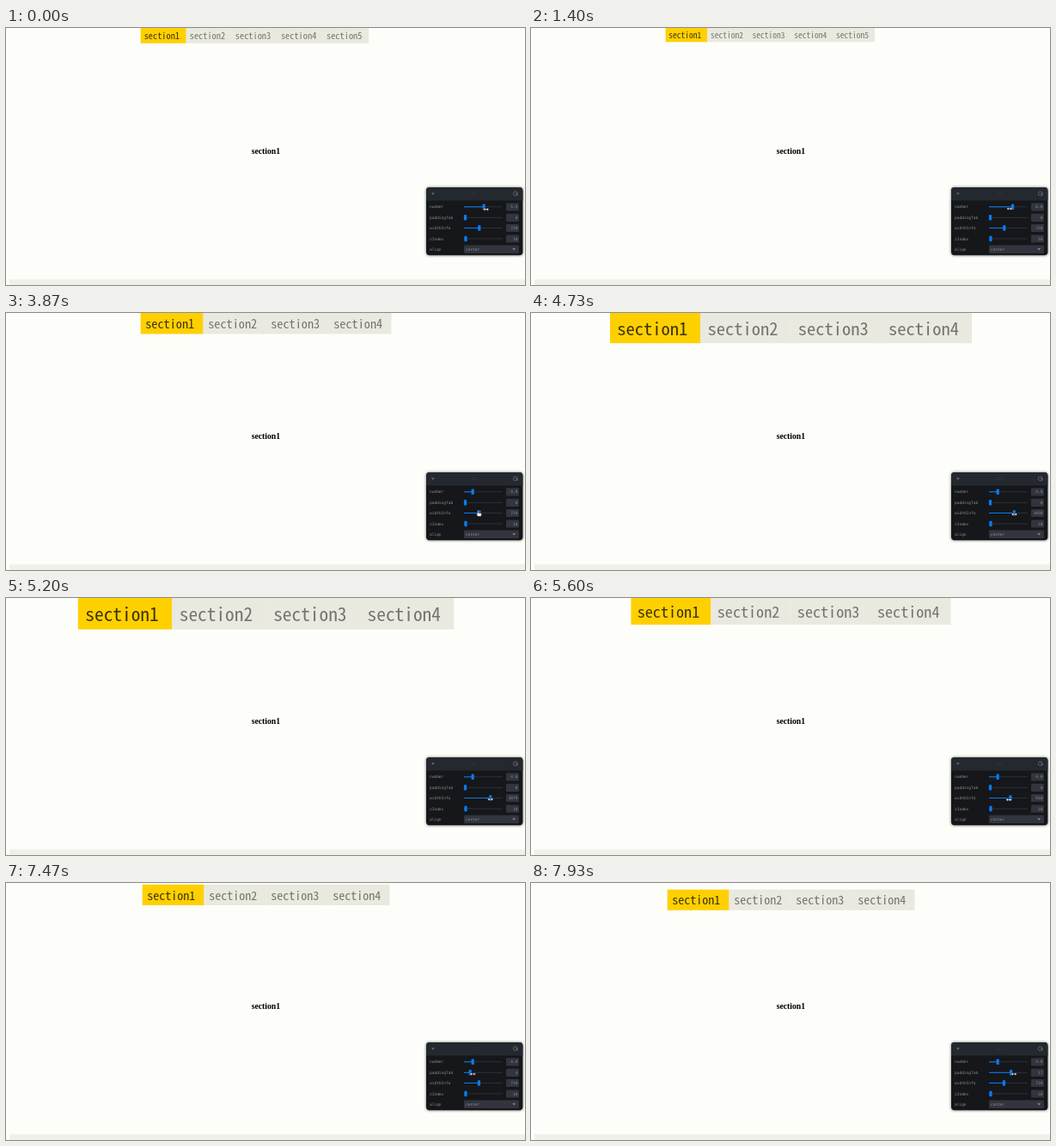
Write an HTML page that moves like this. It is 604 px wide and 300 px high and loops after 8 s.

```html
<!DOCTYPE html>
<html lang="en">
<head>
<meta charset="utf-8">
<title>Section tabs</title>
<style>
  html, body { margin: 0; width: 100%; height: 100%; overflow: hidden; background: #fdfdfa; }
  svg { display: block; width: 604px; height: 300px; }
  .tab { font-family: "Noto Sans Mono CJK JP", "Noto Sans CJK JP", "Open Sans", sans-serif; font-weight: 300; fill: #74746e; }
  .tab.on { fill: #3d320a; }
  .head { font: bold 9.73px "Liberation Serif", serif; fill: #000; text-anchor: middle; }
  .gui { font: 4.5px "DejaVu Sans Mono", "Noto Sans Mono", monospace; fill: #8c8e92; }
  .num { text-anchor: end; }
</style>
</head>
<body>
<svg viewBox="0 0 604 300">
  <defs>
    <clipPath id="clip"><rect id="view" height="60"/></clipPath>
    <filter id="blur" x="-20%" y="-20%" width="140%" height="140%"><feGaussianBlur stdDeviation="1.5"/></filter>
  </defs>
  <rect x="4" y="293.5" width="600" height="6.5" fill="#f0f0e8"/>
  <g id="tabs" clip-path="url(#clip)"></g>
  <text class="head" x="302.4" y="146.5">section1</text>
  <rect x="488.7" y="185.7" width="113" height="80" rx="4" fill="#55564c" opacity=".7" filter="url(#blur)"/>
  <rect x="489" y="186" width="112.4" height="79.3" rx="4" fill="#15171a"/>
  <path d="M489 201.5V190a4 4 0 0 1 4-4h104.4a4 4 0 0 1 4 4v11.5z" fill="#24282f"/>
  <path d="M495 192.4h3.8l-1.9 2.3z" fill="#74777c"/>
  <g id="grip" fill="#3c4048"></g>
  <g fill="none" stroke="#74777c" stroke-width=".7"><circle cx="592.8" cy="193.3" r="2.4"/><path d="M592.8 193.3h2.2v2.4"/></g>
  <g id="rows"></g>
  <path id="hand" d="M-1.6 3.6L-3 .8c-.3-1 .7-1.2 1.2-.3V-3c0-1 1.3-1 1.3 0v2.3l2.8.5c.6.2.8.6.7 1.2L2.5 3.6z" fill="#fff" stroke="#111" stroke-width=".6"/>
  <path id="arrows" d="M-3.4 0L-1.2-2V-.7H1.2V-2L3.4 0 1.2 2V.7H-1.2V2z" fill="#fff" stroke="#111" stroke-width=".6"/>
</svg>
<script>
const LOOP = 8000, SCALE = 0.4056, MID = 302.4, LAG = 80;
const BLUE = "#087cf5", FIELD = "#32353d";
const $ = id => document.getElementById(id);

function set(el, attrs) {
  for (const k in attrs) el.setAttribute(k, attrs[k]);
}
function add(parent, tag, attrs, text) {
  const el = document.createElementNS("http://www.w3.org/2000/svg", tag);
  set(el, attrs);
  if (text) el.textContent = text;
  return parent.appendChild(el);
}

// Pointer stops: time, x, y. Every slider value follows from this path.
const PATH = [
  [-80, 556, 212], [300, 568.5, 210.5], [1190, 567.3, 210], [1400, 557, 211],
  [1900, 535, 211], [2300, 535, 211], [2600, 540, 211.5], [2900, 543.3, 212],
  [3330, 544, 213], [3900, 550.8, 235], [4000, 550.8, 235], [4650, 562.3, 235],
  [5100, 563.8, 235], [5270, 563.8, 235], [5850, 550.3, 236], [6130, 551, 238],
  [6470, 540, 251], [7130, 535, 224], [7270, 535, 223], [7930, 562, 223]
];
function pointer(t) {
  const n = PATH.findIndex(p => p[0] > t);
  if (n < 0) return PATH[PATH.length - 1].slice(1);
  const [a, b] = [PATH[n - 1], PATH[n]];
  const k = (t - a[0]) / (b[0] - a[0]);
  return [a[1] + (b[1] - a[1]) * k, a[2] + (b[2] - a[2]) * k];
}

// Each slider is dragged once, between `from` and `to`.
const SLIDERS = {
  number: { y: 208.8, from: -LAG, to: 2950, origin: 534.5, min: 3, unit: 8.7, step: 0.5, digits: 1 },
  paddingTab: { y: 221.3, from: 7270, to: LOOP, origin: 534.5, min: 0, unit: 1.42, step: 1, digits: 0 },
  widthInfo: { y: 233.5, from: 4000, to: 5900, origin: 550.8, min: 720, unit: 0.0362, step: 1, digits: 0 },
  zIndex: { y: 246, from: 0, to: 0, origin: 535, min: 10, unit: 1, step: 1, digits: 0 }
};

function value(s, t) {
  if (s.to <= s.from || t - LAG < s.from) return s.min;
  const x = pointer(Math.min(t - LAG, s.to))[0];
  return s.min + Math.round((x - s.origin) / s.unit / s.step) * s.step;
}

const rows = $("rows");
const label = (text, x, y) => add(rows, "text", { class: "gui", x, y: y + 1.6 }, text);
for (const name in SLIDERS) {
  const s = SLIDERS[name], y = s.y;
  label(name, 493, y);
  add(rows, "rect", { x: 533, y: y - 0.4, width: 45, height: 0.8, fill: FIELD });
  s.fill = add(rows, "rect", { x: 533, y: y - 0.5, height: 1, fill: BLUE });
  s.thumb = add(rows, "rect", { y: y - 3.2, width: 3.2, height: 6.4, rx: 0.8, fill: BLUE });
  add(rows, "rect", { x: 582, y: y - 4.6, width: 15, height: 9.2, rx: 1.2, fill: FIELD });
  s.text = add(rows, "text", { class: "gui num", x: 595.5, y: y + 1.6 });
}
label("align", 493, 258.2);
add(rows, "rect", { x: 533, y: 253.6, width: 64, height: 9.4, rx: 1.2, fill: FIELD });
label("center", 535, 258.2);
add(rows, "path", { d: "M589.3 257.3h3.8l-1.9 2.3z", fill: "#8c8e92" });

for (let i = 0; i < 6; i++) {
  add($("grip"), "circle", { cx: 543 + i % 3 * 2.2, cy: 192.3 + (i > 2) * 2.2, r: 0.5 });
}

const tabs = Array.from({ length: 5 }, (_, i) => ({
  box: add($("tabs"), "rect", { fill: i ? "#e9e9e0" : "#ffd000" }),
  label: add($("tabs"), "text", { class: i ? "tab" : "tab on" }, "section" + (i + 1))
}));

function drawTabs(count, width, pad) {
  const full = width * SCALE, w = full / count, h = w * 0.335;
  const left = MID - full / 2, top = pad * 0.45;
  set($("view"), { x: left, width: full });
  tabs.forEach((tab, i) => {
    const x = left + i * w;
    set(tab.box, { x, y: top, width: w + 0.3, height: h });
    set(tab.label, { x: x + w * 0.08, y: top + h * 0.735, "font-size": w * 0.195 });
  });
}

function draw(t) {
  const values = Object.values(SLIDERS).map(s => {
    const v = value(s, t), x = s.origin + (v - s.min) * s.unit;
    set(s.fill, { width: x - 533 });
    set(s.thumb, { x: x - 1.6 });
    s.text.textContent = v.toFixed(s.digits);
    return v;
  });
  drawTabs(values[0], values[2], values[1]);

  const dragging = Object.values(SLIDERS).some(s => t > s.from + LAG && t < s.to);
  const transform = `translate(${pointer(t)})`;
  set($("hand"), { transform, visibility: dragging ? "hidden" : "visible" });
  set($("arrows"), { transform, visibility: dragging ? "visible" : "hidden" });
}

const start = performance.now();
function tick(now) {
  draw(Math.max(0, now - start) % LOOP);
  requestAnimationFrame(tick);
}
draw(0);
requestAnimationFrame(tick);
</script>
</body>
</html>
```
